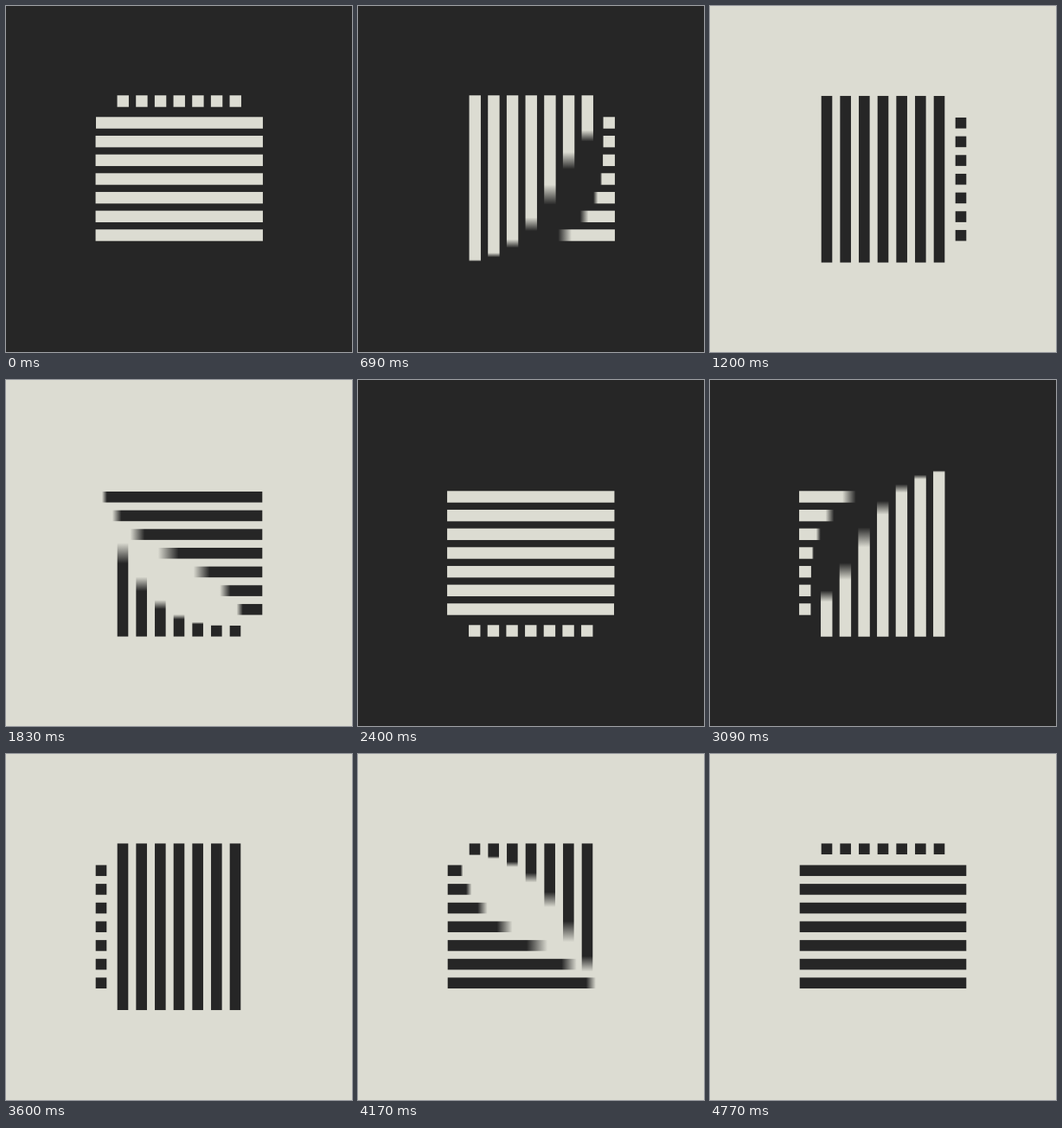
Animation, 400 px wide and 400 px high, one loop 4.8 s. Source, as an HTML page with a canvas:

```html
<!DOCTYPE html>
<html lang="en">
<head>
<meta charset="utf-8">
<title>Turning bars</title>
<style>
  html, body { margin: 0; width: 100%; height: 100%; overflow: hidden; background: #262626; }
  canvas { display: block; width: 400px; height: 400px; }
</style>
</head>
<body>
<canvas id="stage" width="400" height="400"></canvas>
<script>
const ctx = document.getElementById('stage').getContext('2d');

const DARK = '#262626', LIGHT = '#dcdcd2';
const TURN = 1200;              // one quarter turn, ms
const MOVE = 640, STAGGER = 53; // per bar, ms
const SHUTTER = 30;             // motion blur, ms
const COUNT = 7, PITCH = 65 / 3, REACH = 90;

const clamp = v => Math.min(1, Math.max(0, v));
const ease = u => u < 0.5 ? 4 * u ** 3 : 1 - 4 * (1 - u) ** 3;
const progress = (t, slot) => ease(clamp((t - slot * STAGGER) / MOVE));

// A bar from (x, y) along the given angle, its tip smeared from length a to b.
function bar(x, y, angle, a, b, size, color) {
  const near = Math.min(a, b), far = Math.max(a, b);
  ctx.save();
  ctx.translate(x, y);
  ctx.rotate(angle);
  if (far - near < 0.05) {
    ctx.fillStyle = color;
  } else {
    const fade = ctx.createLinearGradient(near, 0, far, 0);
    fade.addColorStop(0, color);
    fade.addColorStop(1, color + '00');
    ctx.fillStyle = fade;
  }
  ctx.fillRect(0, -size / 2, far, size);
  ctx.restore();
}

function draw(time) {
  const turn = Math.floor(time / TURN) % 4;
  const t = time % TURN;
  const odd = turn % 2 === 1;
  const ink = odd ? DARK : LIGHT;
  const size = odd ? 12.6 : 13.4;
  const edge = REACH + size / 2;
  const span = 2 * REACH;

  ctx.setTransform(1, 0, 0, 1, 0, 0);
  ctx.fillStyle = odd ? LIGHT : DARK;
  ctx.fillRect(0, 0, 400, 400);
  ctx.translate(200, 200);
  ctx.rotate(turn * Math.PI / 2);
  ctx.translate(0.25, 0);

  for (let i = 0; i < COUNT; i++) {
    const place = (i - 3) * PITCH;
    const shrink = s => size + span * (1 - progress(s, i));
    const grow = s => size + span * progress(s, i + 3);
    bar(edge, place, Math.PI, shrink(t), shrink(t + SHUTTER), size, ink);
    bar(place, -edge, Math.PI / 2, grow(t), grow(t + SHUTTER), size, ink);
  }
}

function tick() {
  draw(performance.now() % (4 * TURN));
  requestAnimationFrame(tick);
}
draw(0);
requestAnimationFrame(tick);
</script>
</body>
</html>
```
